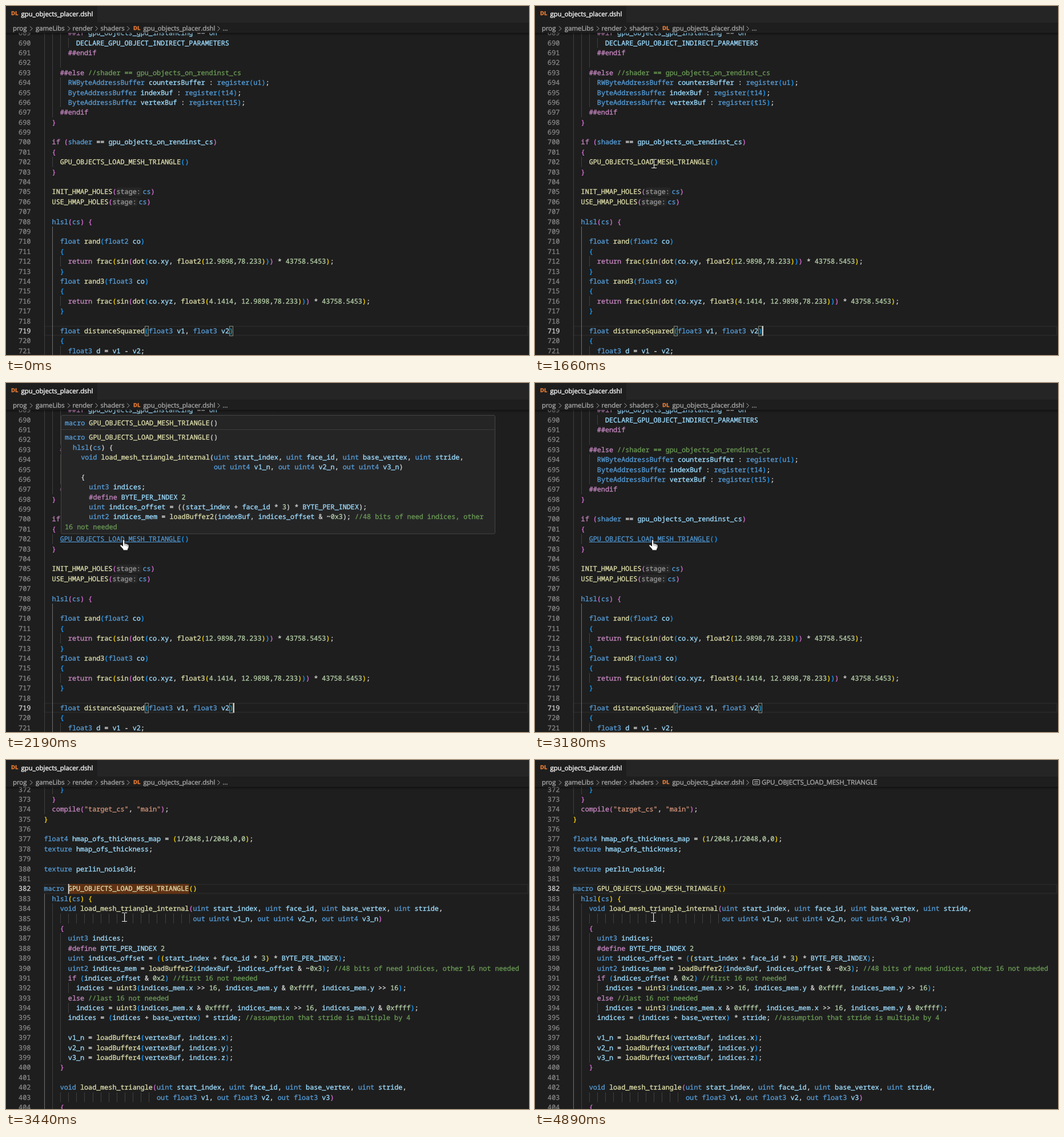
Animation of 916 by 611 pixels, one loop 5290 ms. Source, as an HTML page with a canvas:

```html
<!DOCTYPE html>
<html lang="en">
<head>
<meta charset="utf-8">
<title>Go to definition</title>
<style>
html, body { margin: 0; width: 100%; height: 100%; overflow: hidden; background: #1e1e1e; }
canvas { display: block; }
</style>
</head>
<body>
<canvas id="stage" width="916" height="611"></canvas>
<script>
const ctx = document.getElementById('stage').getContext('2d');
const W = 916, H = 611, LOOP = 5290;
const LEFT = 66.5, CHAR = 7.055, ROW = 17.39, TOP = 47;
const BASE = 4.2;    // row centre to baseline
const WEIGHT = 0.35; // extra stroke that thickens the glyphs
const MONO = '11.75px "Noto Sans Mono", "DejaVu Sans Mono", monospace';
const UI = '11.35px "Open Sans", "Noto Sans", sans-serif';
const ICON = 'bold 9.5px "Open Sans", "Noto Sans", sans-serif';
const HINT_W = 46;

const C = {
  bg: '#1e1e1e', panel: '#252526', text: '#d4d4d4', key: '#569cd6', name: '#9cdcfe',
  func: '#dcdcaa', flow: '#c586c0', num: '#b5cea8', note: '#6a9955', str: '#ce9178',
  link: '#4e94ce', guide: '#404040', guideOn: '#707070', caret: '#d8d8d4'
};
const BRACKETS = ['#ffd700', '#da70d6', '#179fff'];
const KEYWORD = /^((float|uint)\d?|void|out|texture|macro|hlsl|register|shader|cs|(RW)?ByteAddressBuffer|u1|t1[45])$/;
const TYPE = /^(float|uint)\d$/;
const FLOW = /^(if|else|return|compile)$/;
const MACRO = 'GPU_OBJECTS_LOAD_MESH_TRIANGLE';

// '@' marks the inlay hint
const callSite = `      ##if gpu_objects_gpu_instancing == on
        DECLARE_GPU_OBJECT_INDIRECT_PARAMETERS
      ##endif

    ##else //shader == gpu_objects_on_rendinst_cs
      RWByteAddressBuffer countersBuffer : register(u1);
      ByteAddressBuffer indexBuf : register(t14);
      ByteAddressBuffer vertexBuf : register(t15);
    ##endif
  }

  if (shader == gpu_objects_on_rendinst_cs)
  {
    ${MACRO}()
  }

  INIT_HMAP_HOLES(@cs)
  USE_HMAP_HOLES(@cs)

  hlsl(cs) {

    float rand(float2 co)
    {
      return frac(sin(dot(co.xy, float2(12.9898,78.233))) * 43758.5453);
    }
    float rand3(float3 co)
    {
      return frac(sin(dot(co.xyz, float3(4.1414, 12.9898,78.233))) * 43758.5453);
    }

    float distanceSquared(float3 v1, float3 v2)
    {
      float3 d = v1 - v2;`;

const macroHead = `macro ${MACRO}()
  hlsl(cs) {
    void load_mesh_triangle_internal(uint start_index, uint face_id, uint base_vertex, uint stride,
                                     out uint4 v1_n, out uint4 v2_n, out uint4 v3_n)
    {
      uint3 indices;
      #define BYTE_PER_INDEX 2
      uint indices_offset = ((start_index + face_id * 3) * BYTE_PER_INDEX);
      uint2 indices_mem = loadBuffer2(indexBuf, indices_offset & ~0x3); //48 bits of need indices, other`;

const definition = `    }
  }
  compile("target_cs", "main");
}

float4 hmap_ofs_thickness_map = (1/2048,1/2048,0,0);
texture hmap_ofs_thickness;

texture perlin_noise3d;

${macroHead} 16 not needed
      if (indices_offset & 0x2) //first 16 not needed
        indices = uint3(indices_mem.x >> 16, indices_mem.y & 0xffff, indices_mem.y >> 16);
      else //last 16 not needed
        indices = uint3(indices_mem.x & 0xffff, indices_mem.x >> 16, indices_mem.y & 0xffff);
      indices = (indices + base_vertex) * stride; //assumption that stride is multiple by 4

      v1_n = loadBuffer4(vertexBuf, indices.x);
      v2_n = loadBuffer4(vertexBuf, indices.y);
      v3_n = loadBuffer4(vertexBuf, indices.z);
    }

    void load_mesh_triangle(uint start_index, uint face_id, uint base_vertex, uint stride,
                            out float3 v1, out float3 v2, out float3 v3)
    {`;

function wordColor(word, next) {
  if (FLOW.test(word)) return C.flow;
  if (TYPE.test(word) && next === '(') return C.func;
  if (KEYWORD.test(word)) return C.key;
  return next === '(' ? C.func : C.name;
}

// Splits code into coloured tokens; depth < 0 leaves brackets plain
function tokenize(source, depth) {
  const paired = depth >= 0;
  return source.split('\n').map(line => {
    const tokens = [];
    let shift = 0;
    for (const m of line.matchAll(/\/\/.*|"[^"]*"|##?\w+|\w+|\s+|./g)) {
      const text = m[0], next = line[m.index + text.length];
      if (!text.trim()) continue;
      let color = C.text;
      if (text.startsWith('//')) color = C.note;
      else if (text[0] === '"') color = C.str;
      else if (text[0] === '#') color = C.flow;
      else if (/^\d/.test(text)) color = C.num;
      else if (/^\w/.test(text)) color = wordColor(text, next);
      else if (paired && /[({]/.test(text)) color = BRACKETS[depth++ % 3];
      else if (paired && /[)}]/.test(text)) color = BRACKETS[--depth % 3];
      tokens.push({ text, color, x: m.index * CHAR + shift });
      if (text === '@') shift += HINT_W - CHAR;
    }
    return tokens;
  });
}

function guideLevels(source) {
  const lines = source.split('\n');
  const level = i => Math.ceil(lines[i].search(/\S/) / 2);
  return lines.map((line, i) => {
    if (line) return level(i);
    const above = level(i - 1), below = level(i + 1);
    return above === below ? above : Math.min(above, below) + 1;
  });
}

const makeView = (source, first, firstY, depth) =>
  ({ rows: tokenize(source, depth), guides: guideLevels(source), first, firstY });
const callView = makeView(callSite, 689, 47, 2);
const defView = makeView(definition, 372, 51.3, 3);
const hoverRows = tokenize(macroHead, -1);
hoverRows.push([{ text: '16 not needed', color: C.note, x: 0 }]);

const colX = col => LEFT + col * CHAR;
const lineY = (view, n) => view.firstY + (n - view.first) * ROW;

function fill(color, x, y, w, h) {
  ctx.fillStyle = color;
  ctx.fillRect(x, y, w, h);
}

function label(text, x, y, color, font) {
  ctx.font = font;
  ctx.fillStyle = ctx.strokeStyle = color;
  ctx.lineWidth = WEIGHT;
  ctx.lineJoin = 'round';
  ctx.fillText(text, x, y);
  ctx.strokeText(text, x, y);
}

function line(color, width, ...pts) {
  ctx.strokeStyle = color;
  ctx.lineWidth = width;
  ctx.beginPath();
  for (let i = 0; i < pts.length; i += 2) ctx.lineTo(pts[i], pts[i + 1]);
  ctx.stroke();
}

function roundBox(x, y, w, h, r, bg, border) {
  ctx.beginPath();
  ctx.roundRect(x, y, w, h, r);
  if (bg) { ctx.fillStyle = bg; ctx.fill(); }
  if (border) { ctx.strokeStyle = border; ctx.lineWidth = 1; ctx.stroke(); }
}

function drawTokens(tokens, x, y, linked) {
  const base = Math.round(y + BASE);
  for (const t of tokens) {
    const tx = x + t.x;
    if (t.text === '@') {
      roundBox(tx, y - 7.5, HINT_W - 2, 15, 3, '#262626');
      label('stage:', tx, base, '#969696', MONO);
    } else if (linked && t.text === MACRO) {
      label(t.text, tx, base, C.link, MONO);
      fill(C.link, tx, base + 1, t.text.length * CHAR, 1);
    } else {
      label(t.text, tx, base, t.color, MONO);
    }
  }
}

function bracketBox(view, n, col) {
  const x = Math.round(colX(col)) + 0.5, y = Math.round(lineY(view, n) - ROW / 2) + 0.5;
  ctx.fillStyle = 'rgba(0,100,0,.1)';
  ctx.fillRect(x, y, 6, 17);
  ctx.strokeStyle = '#888';
  ctx.lineWidth = 1;
  ctx.strokeRect(x, y, 6, 17);
}

function drawEditor(view, s) {
  const activeY = Math.round(lineY(view, s.line) - ROW / 2);
  ctx.strokeStyle = '#282828';
  ctx.lineWidth = 1.8;
  ctx.strokeRect(LEFT + 1, activeY + 0.9, W - LEFT - 3, ROW - 1.8);
  if (s.flash) fill('#613214', colX(6), activeY, MACRO.length * CHAR, ROW);

  view.rows.forEach((tokens, i) => {
    const n = view.first + i, y = lineY(view, n);
    const top = Math.round(y - ROW / 2), bottom = Math.round(y + ROW / 2);
    for (let g = 0; g < view.guides[i]; g++) {
      const on = g === s.guide && n >= s.from && n <= s.to;
      fill(on ? C.guideOn : C.guide, Math.round(colX(g * 2) + 0.4), top, 1, bottom - top);
    }
    label(n, 22.1, Math.round(y + BASE), n === s.line ? '#d0d0d0' : '#858585', MONO);
    drawTokens(tokens, LEFT, y, s.linked);
  });
  for (const [n, col] of s.boxes) bracketBox(view, n, col);
  if (s.caret) fill(C.caret, colX(s.col), activeY, 1.8, ROW);
}

function drawHeader(named) {
  fill(C.bg, 0, 0, W, TOP);
  fill(C.panel, 160, 0, W - 160, 29);
  const shade = ctx.createLinearGradient(0, TOP, 0, TOP + 5);
  shade.addColorStop(0, 'rgba(0,0,0,.4)');
  shade.addColorStop(1, 'rgba(0,0,0,0)');
  fill(shade, 0, TOP, W, 5);

  const file = 'gpu_objects_placer.dshl', gray = '#a9a9a9', orange = '#e37933';
  label('DL', 9, 16, orange, ICON);
  label(file, 26.5, 18, '#ffffff', UI);
  const crumbs = [['prog', 12], ['gameLibs', 52], ['render', 116.5], ['shaders', 165.5], [file, 240.5]];
  for (const [text, x] of crumbs) label(text, x, 43, gray, UI);
  label('DL', 223, 42, orange, ICON);
  for (const x of [44, 110, 158.5, 214, 372.5]) line(gray, 1, x - 2, 35.5, x + 2, 39.5, x - 2, 43.5);
  if (named) {
    roundBox(381.5, 34.5, 12, 9, 1.5, null, '#c5c5c5');
    line('#c5c5c5', 1, 384, 37.5, 391, 37.5);
    line('#c5c5c5', 1, 384, 40.5, 391, 40.5);
    label(MACRO, 397, 43, gray, UI);
  } else {
    label('...', 379.5, 43, gray, UI);
  }
}

function drawHover(alpha) {
  if (alpha <= 0) return;
  ctx.globalAlpha = alpha;
  roundBox(96.5, 56.5, 760, 207.5, 2.5, C.panel, '#454545');
  fill('#3c3c3d', 97, 81, 759, 1);
  drawTokens(hoverRows[0], 103, 69.5);
  hoverRows.forEach((tokens, i) => drawTokens(tokens, 103, 95 + i * ROW));
  ctx.globalAlpha = 1;
}

function drawBeam(x, y) {
  const c = '#f0f0f0';
  x = Math.round(x);
  y = Math.round(y);
  fill(c, x, y - 7, 1, 15);
  for (const end of [-8, 7]) {
    fill(c, x - 4, y + end, 4, 1);
    fill(c, x + 1, y + end, 4, 1);
  }
}

function drawHand(x, y) {
  ctx.save();
  ctx.translate(x, y);
  const hand = new Path2D('M-2.5 1Q-2.5-1-.9-1Q.8-1 .8 1V6Q2 5 3.2 6.6Q4.6 5.8 5.6 7.4Q8 7 8 9.6V12.4Q8 14 6.4 15.6V18H-2V16L-7 10.5Q-8 8.6-6.2 8Q-5 7.8-2.5 10.4Z');
  ctx.lineJoin = 'round';
  ctx.lineWidth = 1;
  ctx.fillStyle = '#ffffff';
  ctx.strokeStyle = '#111111';
  ctx.fill(hand);
  ctx.stroke(hand);
  for (const [px, py] of [[0.8, 6], [3.2, 7], [5.6, 8]]) line('#333333', 0.7, px, py, px, py + 3.5);
  ctx.restore();
}

// Pointer sweeps in at a steady pace, then settles on the macro name
function pointerAt(t) {
  if (t < 1515) {
    const k = Math.floor((t - 930) / 65);
    return [546 - 40.8 * k, 458 - 21.6 * k];
  }
  const k = Math.min(3, Math.floor((t - 1515) / 70));
  const rest = (1 - k / 3) ** 2;
  return [207 + 6 * rest, 275 + 5 * rest];
}

const within = (t, ...spans) => spans.some(([a, b]) => t >= a && t < b);

function stateAt(t) {
  if (t < 3250) return {
    line: 719, col: 47, guide: 1, from: 709, to: 721, boxes: [[719, 25], [719, 46]],
    linked: t >= 1930, caret: within(t, [190, 720], [1250, 1730], [2190, 2720])
  };
  if (t < 3440) return {
    line: 702, col: 20, guide: 1, from: 702, to: 702, boxes: [[701, 2], [703, 2]],
    linked: true, caret: true
  };
  return {
    line: 382, col: 6, guide: 0, from: 383, to: 404, boxes: [],
    flash: t < 3770, caret: within(t, [3440, 3900], [4430, 4890])
  };
}

function draw(t) {
  ctx.textRendering = 'geometricPrecision';
  fill(C.bg, 0, 0, W, H);
  drawEditor(t < 3440 ? callView : defView, stateAt(t));
  drawHeader(t >= 3570);
  if (within(t, [1930, 3180])) drawHover(Math.min(1, 0.22 + 0.6 * Math.floor((t - 1930) / 60)));
  if (t < 930) return;
  const [x, y] = pointerAt(t);
  (within(t, [1930, 3440]) ? drawHand : drawBeam)(x, y);
}

const start = performance.now();
function tick() {
  draw((performance.now() - start) % LOOP);
  requestAnimationFrame(tick);
}
tick();
</script>
</body>
</html>
```
